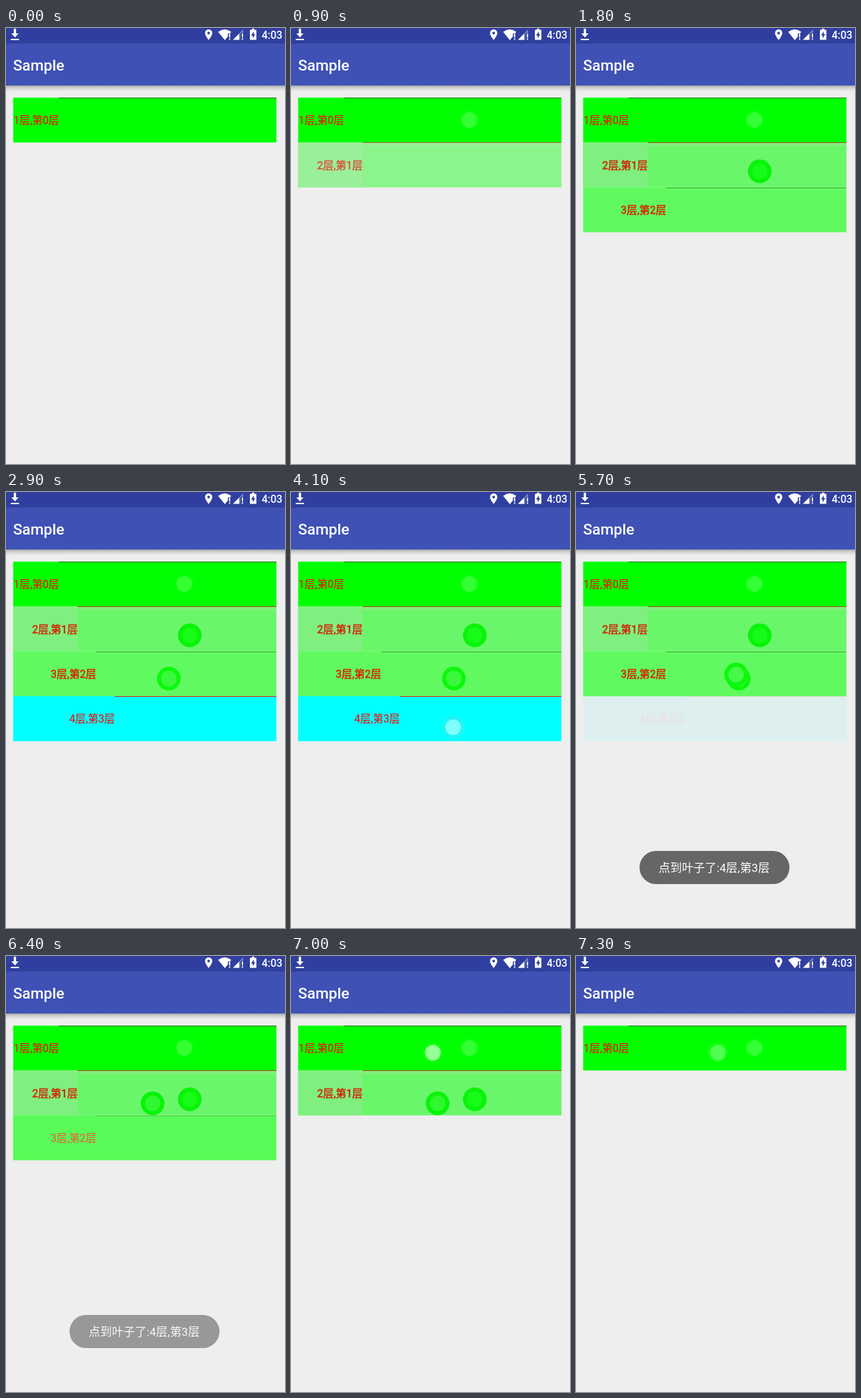
Recreate the animation shown at these times as an HTML page. Size 413 by 645 pixels, loop 8.9 s.

```html
<!DOCTYPE html>
<html lang="zh-CN">
<head>
<meta charset="utf-8">
<title>Sample</title>
<style>
  html, body { margin: 0; width: 100%; height: 100%; overflow: hidden; background: #eee; }
  svg { display: block; width: 413px; height: 645px; }
  text { font-family: Roboto, "Noto Sans CJK SC", "Noto Sans CJK", sans-serif; }
  .bar { font-weight: 500; fill: #fff; }
  .row { font-size: 15.6px; }
  .toast { font-size: 17.2px; fill: #fff; }
</style>
</head>
<body>
<svg id="stage" viewBox="0 0 413 645">
  <defs>
    <linearGradient id="shade" x2="0" y2="1">
      <stop offset="0" stop-color="#000" stop-opacity=".3"/>
      <stop offset=".4" stop-color="#000" stop-opacity=".12"/>
      <stop offset="1" stop-color="#000" stop-opacity="0"/>
    </linearGradient>
  </defs>
  <rect width="413" height="645" fill="#eee"/>
  <rect y="85" width="413" height="9" fill="url(#shade)"/>
  <rect width="413" height="85" fill="#3f51b5"/>
  <rect width="413" height="23" fill="#303f9f"/>
  <g fill="#fff">
    <path d="M11.5 1h3.4v7h3.6l-5.3 6-5.3-6h3.6zM7 16h12.2v2H7z"/>
    <path fill-rule="evenodd" d="M300 2a5.4 5.4 0 0 0-5.4 5.4c0 4 5.4 10.2 5.4 10.2s5.4-6.2 5.4-10.2A5.4 5.4 0 0 0 300 2zm0 3.5a2 2 0 1 1 0 4 2 2 0 0 1 0-4z"/>
    <path d="M314 5.7Q324-1.5 333.5 5.7L331.5 8H328.5V12.5L324 18z"/>
    <path d="M330 8.5h2v5.5h-2zM330 15.3h2v2h-2z"/>
    <path d="M351 2v5.5h-4V17.5H336z" opacity=".35"/>
    <path d="M345 8.5v9h-9z"/>
    <path d="M349 8.5h2v5.5h-2zM349 15.3h2v2h-2z"/>
    <path fill-rule="evenodd" d="M361 2.7h2.9V1h3.8v1.7h2.9v14.8H361zM366.8 5l-4 6h2.3v4.3l4-6h-2.3z"/>
  </g>
  <text class="bar" x="378.5" y="15.5" font-size="15.6">4:03</text>
  <text class="bar" x="10.5" y="63" font-size="22.5">Sample</text>
</svg>
<script>
const LOOP = 8900, LEFT = 10.6, RIGHT = 400.3, TOP = 103, PITCH = 66.4;
const stage = document.getElementById('stage');

function add(parent, tag, attrs = {}, label) {
  const el = document.createElementNS('http://www.w3.org/2000/svg', tag);
  for (const key in attrs) el.setAttribute(key, attrs[key]);
  if (label) el.textContent = label;
  parent.appendChild(el);
  return el;
}

// Each step is [ms, opacity] and holds until the next one.
function play(el, steps) {
  const all = [[0, 0], ...steps];
  all.push([LOOP, all[all.length - 1][1]]);
  const frames = all.map(([ms, opacity]) => ({ offset: ms / LOOP, opacity, easing: 'step-end' }));
  el.animate(frames, { duration: LOOP, iterations: Infinity });
}

// Values spaced 100 ms apart from a start time.
const ramp = (start, ...values) => values.map((v, i) => [start + i * 100, v]);

function addRow(level, { fill, ink, line, heavy, patch, steps }) {
  const g = add(stage, 'g');
  const y = Math.round(TOP + level * PITCH), height = TOP + (level + 1) * PITCH - y;
  const x = 11.3 + level * 27.5, end = Math.round(x + 66.8);
  add(g, 'rect', { x: LEFT, y, width: RIGHT - LEFT, height, fill });
  if (patch) add(g, 'path', { d: `M${LEFT} ${y}H${RIGHT}v6H${end}v${height - 6}H${LEFT}z`, fill: patch });
  add(g, 'rect', { x: end, y, width: RIGHT - end, height: 1, fill: line });
  const label = add(g, 'text', { class: 'row', x, y: 142.2 + level * PITCH, fill: ink },
    `${level + 1}层,第${level}层`);
  if (heavy) {
    label.setAttribute('stroke', ink);
    label.setAttribute('stroke-width', .45);
  }
  if (steps) play(g, steps);
}

function addTouch([x, y, r, ring, core, start, steps]) {
  const g = add(stage, 'g');
  add(g, 'circle', { cx: x, cy: y, r, fill: ring });
  add(g, 'circle', { cx: x, cy: y, r: 11.5, fill: core });
  play(g, [[start, 1], ...steps]);
  const flare = add(g, 'circle', { cx: x, cy: y, r: 11.5, fill: '#fff' });
  play(flare, ramp(start, .4, .2, 0));
}

const rows = [
  { fill: '#0f0', ink: '#f00', line: '#086a08' },
  { fill: '#6af66a', ink: '#d42000', line: '#a84010', heavy: true, patch: '#7ff07f',
    steps: [...ramp(700, .2, .45, .75, 1), ...ramp(7100, .6, .25, 0)] },
  { fill: '#60fa60', ink: '#dc2000', line: '#35a525', heavy: true,
    steps: [...ramp(1600, .3, .65, 1), [6300, 0]] },
  { fill: '#0ff', ink: '#f00', line: '#e02020',
    steps: [...ramp(2700, .3, .7, 1), ...ramp(5500, .65, .3, .07), [6200, 0]] }
];
rows.forEach((row, level) => addRow(level, row));
addRow(2, { fill: '#58fb58', ink: '#ee5a35', line: '#48c840', steps: ramp(6300, 1, 1, .4, 0) });

// x, y, radius, ring, core, start, later steps
[
  [264, 136, 15, '#08ff08', '#33ff33', 600, []],
  [272, 212, 17.5, '#08f408', '#18fa18', 1500, ramp(7100, .6, .25, 0)],
  [241, 276, 17.5, '#0cf80c', '#3cf83c', 2600, [[6300, 0]]],
  [240, 348, 17, '#20f4f4', '#60ffff', 4000, ramp(4200, .6, .25, 0)],
  [237, 270, 17.5, '#0cf80c', '#48f848', 5400, [[6300, 0]]],
  [217, 218, 17.5, '#08f408', '#30f830', 6200, ramp(7100, .6, .25, 0)],
  [210, 143, 15, '#10ff10', '#50ff50', 7000, []]
].forEach(addTouch);

const toast = add(stage, 'g');
add(toast, 'rect', { x: 94, y: 531, width: 222, height: 49, rx: 24.5, fill: '#666' });
add(toast, 'text', { class: 'toast', x: 122.3, y: 562.3 }, '点到叶子了:4层,第3层');
play(toast, [...ramp(4200, .2, .5, .8, 1), ...ramp(6300, .85, .63, .3, 0)]);
</script>
</body>
</html>
```
